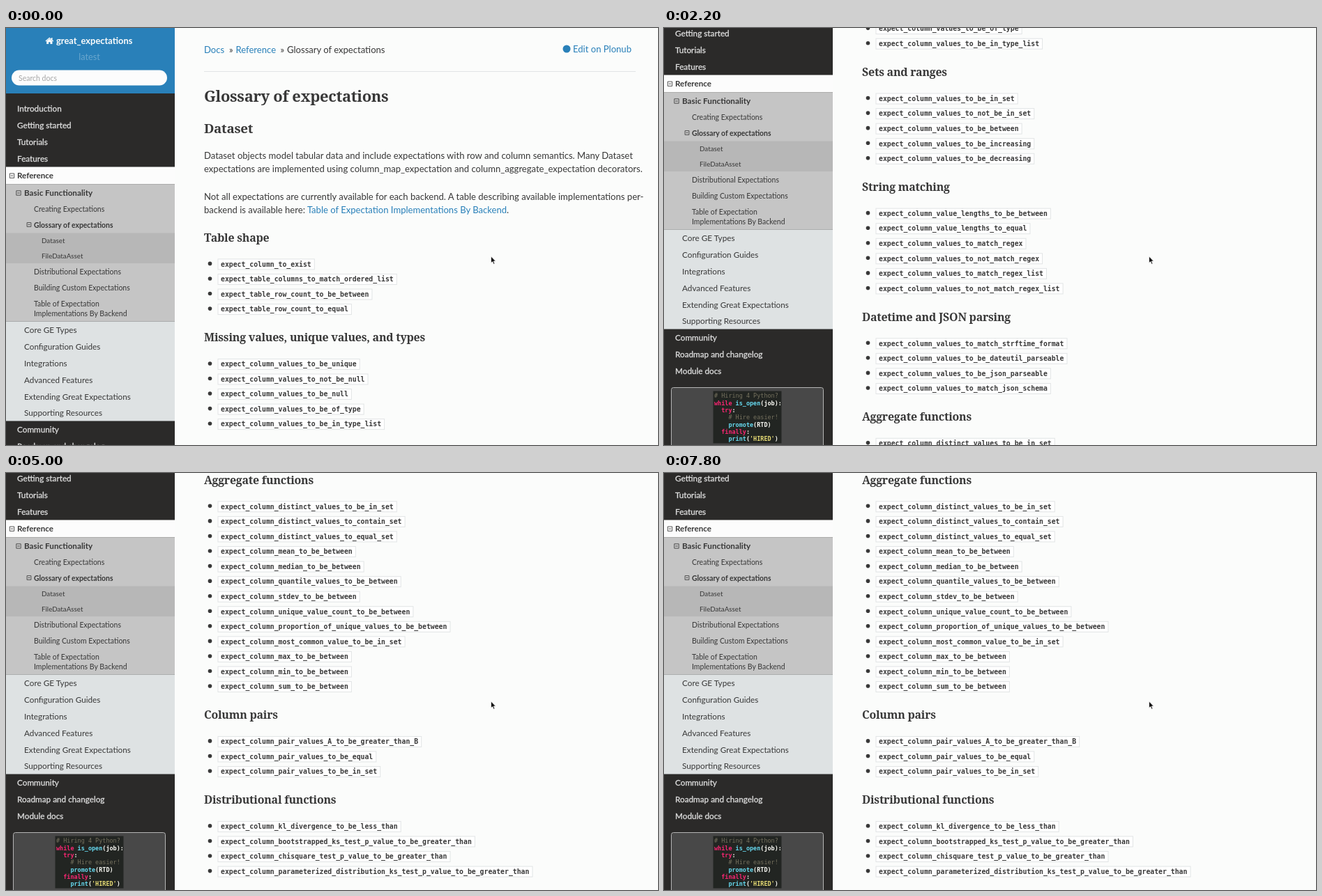
Animation, 935 px wide and 599 px high, one loop 8000 ms. Source, as an HTML page:

```html
<!DOCTYPE html>
<html lang="en">
<head>
<meta charset="utf-8">
<title>Glossary of expectations</title>
<style>
html, body { margin: 0; width: 100%; height: 100%; overflow: hidden; background: #fbfcfb; }
svg { display: block; width: 100%; height: 100%; }
text { font-family: Lato, sans-serif; fill: #383838; white-space: pre; }
.head { font-family: "Noto Serif", serif; font-weight: 700; letter-spacing: -0.015em; }
.mono { font-family: "DejaVu Sans Mono", monospace; font-weight: 700; }
.bold { font-weight: 700; }
.link { fill: #2980b9; }
.light { fill: #dedede; stroke: #dedede; stroke-width: .3px; }
</style>
</head>
<body>
<svg viewBox="0 0 935 599">
  <g id="page"></g>
  <g id="side"></g>
  <path d="M695.5 328v9.6l2.2-2 1.6 3.6 1.6-.7-1.6-3.5h3z" fill="#111" stroke="#fff" stroke-width=".7"/>
</svg>
<script>
const page = document.getElementById('page');
const side = document.getElementById('side');

// y is the visual middle of the line
const text = (x, y, size, str, attrs = '') =>
  `<text x="${x}" y="${(y + size * 0.355).toFixed(2)}" font-size="${size}" ${attrs}>${str}</text>`;
const rect = (x, y, w, h, fill, attrs = '') =>
  `<rect x="${x}" y="${y}" width="${w}" height="${h}" fill="${fill}" ${attrs}/>`;
const head = (y, size, str) => text(284, y, size, str, 'class="head"');
const para = (y, str) => text(284, y, 13.07, str);
const toggle = (x, y, s) =>
  `<path d="M${x - s} ${y - s}h${2 * s}v${2 * s}h${-2 * s}zm1.5 ${s}h${2 * s - 3}" fill="none" stroke="#444" stroke-width=".9"/>`;

const STEP = 21.56;
const CHAR = 5.9;

const item = (name, y) =>
  `<circle cx="292.5" cy="${y - 1}" r="2.8" fill="#383838"/>` +
  rect(304, y - 7.5, name.length * CHAR + 8.5, 15, '#fff', 'stroke="#e1e4e5"') +
  text(308, y - 0.2, 9.8, name, 'class="mono"');

const list = (names, y) => names.split(' ').map((n, i) => item('expect_' + n, y + i * STEP)).join('');

const sections = [
  ['Table shape', 'column_to_exist table_columns_to_match_ordered_list table_row_count_to_be_between table_row_count_to_equal'],
  ['Missing values, unique values, and types', 'column_values_to_be_unique column_values_to_not_be_null column_values_to_be_null column_values_to_be_of_type column_values_to_be_in_type_list'],
  ['Sets and ranges', 'column_values_to_be_in_set column_values_to_not_be_in_set column_values_to_be_between column_values_to_be_increasing column_values_to_be_decreasing'],
  ['String matching', 'column_value_lengths_to_be_between column_value_lengths_to_equal column_values_to_match_regex column_values_to_not_match_regex column_values_to_match_regex_list column_values_to_not_match_regex_list'],
  ['Datetime and JSON parsing', 'column_values_to_match_strftime_format column_values_to_be_dateutil_parseable column_values_to_be_json_parseable column_values_to_match_json_schema'],
  ['Aggregate functions', 'column_distinct_values_to_be_in_set column_distinct_values_to_contain_set column_distinct_values_to_equal_set column_mean_to_be_between column_median_to_be_between column_quantile_values_to_be_between column_stdev_to_be_between column_unique_value_count_to_be_between column_proportion_of_unique_values_to_be_between column_most_common_value_to_be_in_set column_max_to_be_between column_min_to_be_between column_sum_to_be_between'],
  ['Column pairs', 'column_pair_values_A_to_be_greater_than_B column_pair_values_to_be_equal column_pair_values_to_be_in_set'],
  ['Distributional functions', 'column_kl_divergence_to_be_less_than column_bootstrapped_ks_test_p_value_to_be_greater_than column_chisquare_test_p_value_to_be_greater_than column_parameterized_distribution_ks_test_p_value_to_be_greater_than'],
];
const fileItems = 'file_line_regex_match_count_to_be_between file_line_regex_match_count_to_equal file_hash_to_equal file_size_to_be_between file_to_exist file_to_have_valid_table_header file_to_be_valid_json';

function buildPage() {
  let out = text(284, 31, 13.07, 'Docs', 'class="link"') +
    text(320, 31, 13.07, '»') +
    text(329.5, 31, 13.07, 'Reference', 'class="link"') +
    text(393.5, 31, 13.07, '»') +
    text(403, 31, 13.07, 'Glossary of expectations') +
    '<circle cx="804" cy="30" r="5.5" fill="#2980b9"/>' +
    text(813, 30, 13.07, 'Edit on Plonub', 'class="link"') +
    rect(284, 62, 619, 1, '#e1e4e5') +
    head(98, 21.9, 'Glossary of expectations') +
    head(144.5, 18.8, 'Dataset') +
    para(183, 'Dataset objects model tabular data and include expectations with row and column semantics. Many Dataset') +
    para(202.5, 'expectations are implemented using column_map_expectation and column_aggregate_expectation decorators.') +
    para(242, 'Not all expectations are currently available for each backend. A table describing available implementations per-') +
    para(261.5, 'backend is available here: <tspan class="link">Table of Expectation Implementations By Backend</tspan>.');
  let y = 301;
  for (const [title, names] of sections) {
    out += head(y, 15.95, title) + list(names, y + 38.4);
    y += 57.3 + names.split(' ').length * STEP;
  }
  out += head(1710.5, 18.8, 'FileDataAsset') +
    para(1749.5, 'File data assets reason at the file level, and the line level (for text data).') +
    list(fileItems, 1789.5);
  for (const [x, w, label] of [[284, 76, 'Previous'], [847, 56, 'Next']])
    out += rect(x, 1951, w, 26, '#f3f6f6', 'stroke="#e1e4e5"') + text(x + 10, 1964, 13.07, label);
  return out;
}

// left edge, middle, size, label, weight class
const menu = [
  [26, 237, 11.7, 'Basic Functionality', 'bold'],
  [40, 260.5, 10.5, 'Creating Expectations'],
  [40, 283.5, 10.4, 'Glossary of expectations', 'bold'],
  [51, 306, 9.8, 'Dataset'],
  [51, 328, 9.8, 'FileDataAsset'],
  [40, 350.5, 10.5, 'Distributional Expectations'],
  [40, 373.5, 10.5, 'Building Custom Expectations'],
  [40, 396, 10.5, 'Table of Expectation'],
  [40, 410.5, 10.5, 'Implementations By Backend'],
];
const subMenu = ['Core GE Types', 'Configuration Guides', 'Integrations', 'Advanced Features', 'Extending Great Expectations', 'Supporting Resources'];

const hue = { c: '#75715e', k: '#f92672', f: '#66d9ef', w: '#f8f8f2', s: '#e6db74' };
const adLines = [
  [0, 'c', '# Hiring 4 Python?'],
  [0, 'k', 'while ', 'f', 'is_open', 'w', '(job):'],
  [2, 'k', 'try', 'w', ':'],
  [4, 'c', '# Hire easier!'],
  [4, 'f', 'promote', 'w', '(RTD)'],
  [2, 'k', 'finally', 'w', ':'],
  [4, 'f', 'print', 'w', '(', 's', "'HIRED'", 'w', ')'],
];

function adLine([indent, ...parts], i) {
  let spans = '';
  for (let p = 0; p < parts.length; p += 2)
    spans += `<tspan fill="${hue[parts[p]]}">${parts[p + 1]}</tspan>`;
  const weight = parts[0] === 'c' ? ' style="font-weight:400"' : '';
  return text(72 + indent * 5.1, 660.3 + i * 10.35, 8.48, spans, 'class="mono"' + weight);
}

function buildSide() {
  const light = (y, str) => text(16, y, 11.76, str, 'class="light"');
  return rect(0, 0, 242, 740, '#2b2a29') +
    rect(0, 0, 242, 94, '#2980b9') +
    '<path d="M56.5 18.6l5.8-5.2 2.6 2.3v-1.6h1.6v3l1.7 1.5-.8.9-5.1-4.5-5.1 4.5zM58.2 19l4.1-3.6 4.1 3.6v4h-2.9v-2.8h-2.4v2.8h-2.9z" fill="#fcfcfc"/>' +
    text(72, 18.5, 12.9, 'great_expectations', 'class="bold" style="fill:#fcfcfc"') +
    text(119.5, 41.5, 12.7, 'latest', 'text-anchor="middle" style="fill:#fff;fill-opacity:.3"') +
    rect(8, 60.5, 223, 22, '#fcfcfc', 'rx="11"') +
    text(18, 72, 10.5, 'Search docs', 'style="fill:#a6a6a6"') +
    ['Introduction', 'Getting started', 'Tutorials', 'Features'].map((s, i) => light(116 + i * 23.9, s)).join('') +
    rect(0, 199.5, 242, 25, '#fcfcfc') +
    rect(0, 224.5, 242, 197, '#c5c5c5') +
    rect(0, 294.5, 242, 43.5, '#b7b7b7') +
    rect(0, 421.5, 242, 143, '#dee2e3') +
    toggle(8.5, 212.2, 3.2) + toggle(18, 237, 3.2) + toggle(33, 282.5, 2.9) +
    text(16, 212, 11.6, 'Reference', 'class="bold"') +
    menu.map(([x, y, size, str, cls = '']) => text(x, y, size, str, `class="${cls}"`)).join('') +
    subMenu.map((s, i) => text(26, 434 + i * 23.85, 11.76, s)).join('') +
    ['Community', 'Roadmap and changelog', 'Module docs'].map((s, i) => light(577 + i * 23.85, s)).join('') +
    rect(10.5, 648.5, 218, 100, '#484848', 'rx="3" stroke="#b5b5b5"') +
    rect(70.5, 653.5, 98, 75, '#222522') +
    adLines.map(adLine).join('');
}

page.innerHTML = buildPage();
side.innerHTML = buildSide();

// The scroll runs down to TURN, then back the same way.
const LOOP = 8000, TICK = 200, TURN = 6400, SIDE_MAX = 132;
const keys = [[0, 0], [800, 280.5], [2200, 546.5], [3800, 804], [4800, 1073], [5000, 1095], [6200, 1313], [TURN, 1380]];

function scrollAt(ms) {
  const t = TURN - Math.abs(TURN - ms);
  const i = Math.max(1, keys.findIndex(k => k[0] >= t));
  const [t0, y0] = keys[i - 1], [t1, y1] = keys[i];
  return y0 + (y1 - y0) * (t - t0) / (t1 - t0);
}

function draw(ms) {
  const y = scrollAt(Math.floor(ms / TICK) * TICK);
  page.setAttribute('transform', `translate(0 ${-y})`);
  side.setAttribute('transform', `translate(0 ${-Math.min(y, SIDE_MAX)})`);
}

const start = performance.now();
function loop() {
  draw((performance.now() - start) % LOOP);
  requestAnimationFrame(loop);
}
loop();
</script>
</body>
</html>
```
